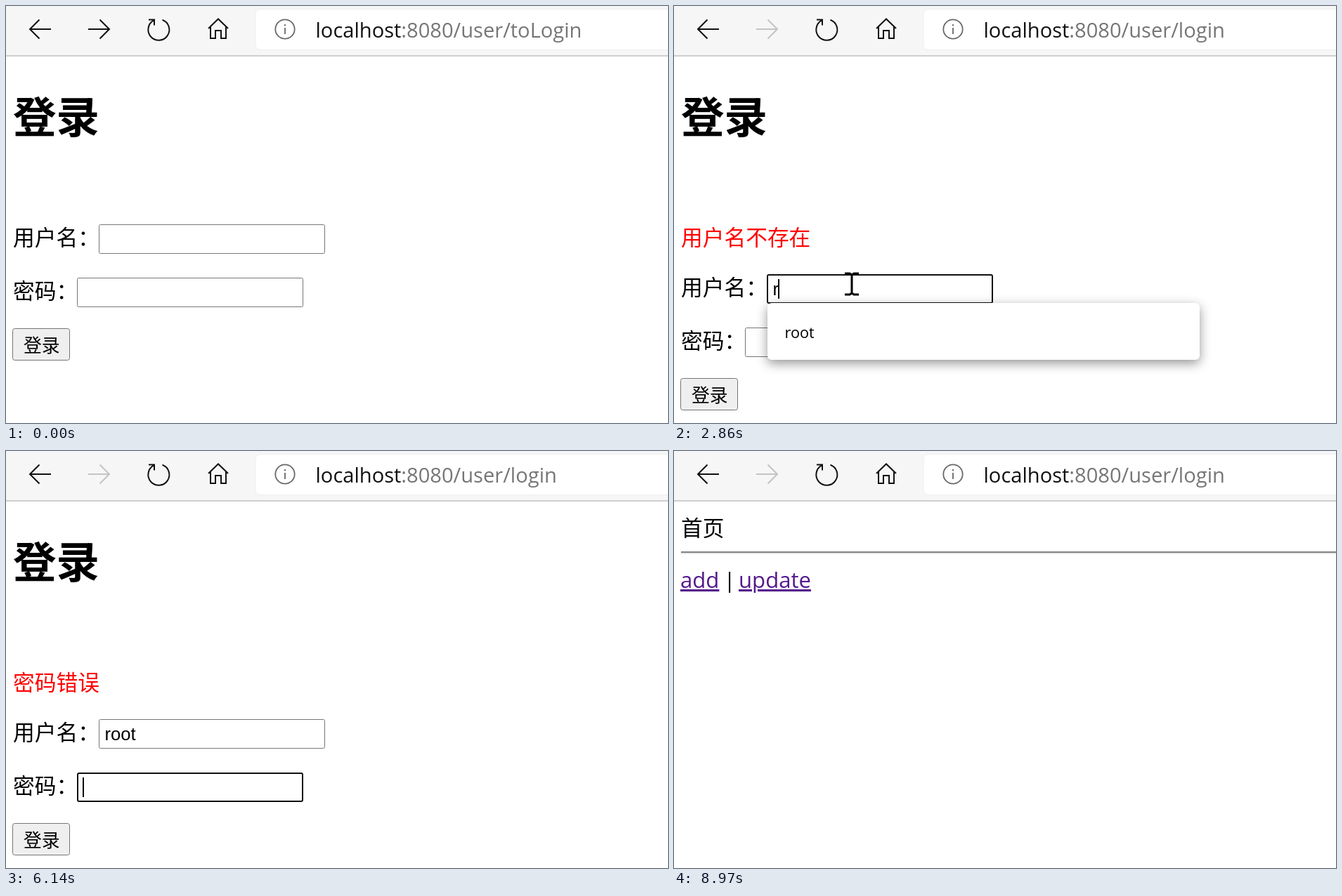
An HTML page for the animation above (9280 ms loop, 942 by 594 pixels).

```html
<!DOCTYPE html>
<html lang="zh-CN">
<head>
<meta charset="utf-8">
<style>
  html, body { margin: 0; width: 100%; height: 100%; overflow: hidden; background: #fff; }
  svg { display: block; width: 942px; height: 594px; }
  text { white-space: pre; }
  .zh { font: 30.72px "Noto Sans CJK SC", "Noto Sans CJK", sans-serif; }
  .ui { font-family: "Open Sans", "Noto Sans", sans-serif; }
  .field { font: 25.6px "Liberation Sans", Arial, sans-serif; }
  .link { font-size: 31.1px; fill: #551a8b; text-decoration: underline; text-decoration-thickness: 2px; text-underline-offset: 3px; }
  .icon { fill: none; stroke: #111; stroke-width: 2; }
  .box { fill: #fff; stroke: #767676; stroke-width: 1; }
  .box.hover { stroke: #4f4f4f; }
  .box.focus { stroke: #101010; stroke-width: 2; transform: translate(.5px, .5px); width: 320px; height: 40px; }
  #button { fill: #efefef; }
  #button.hover { fill: #e5e5e5; }
  #button.press { fill: #f5f5f5; }
  #popup { filter: drop-shadow(0 5px 8px rgba(0, 0, 0, .42)); }
  [hidden] { display: none; }
</style>
</head>
<body>
<svg viewBox="0 0 942 594">
  <clipPath id="view"><rect width="942" height="582"/></clipPath>

  <rect width="942" height="70.5" fill="#f6f6f6"/>
  <rect y="70" width="942" height="2" fill="#cfcfcf"/>
  <rect x="355" y="4.5" width="620" height="58" rx="7" fill="#fff" stroke="#efefef"/>
  <path class="icon" d="M64 33H34M47.500 19.500L34 33L47.500 46.500"/>
  <path class="icon" id="forward" d="M117 33H147M133.500 19.500L147 33L133.500 46.500"/>
  <path class="icon" id="reload" d="M222.500 19.700A15 15 0 1 1 210 20.700M203 19.500H211V27.500"/>
  <path class="icon" id="stop" d="M204 20L230 46M230 20L204 46"/>
  <path class="icon" d="M288 32L302 18.500L316 32M291 29.500V46H298V35H306V46H313V29.500"/>
  <g class="icon" style="stroke:#686868;stroke-width:1.8">
    <circle cx="397" cy="33" r="13.700"/>
    <path d="M397 31V40M397 26V28.500"/>
  </g>
  <text class="ui" x="440.500" y="45.300" font-size="29.080" fill="#767676"><tspan fill="#111">localhost</tspan>:8080/user/<tspan id="path"></tspan></text>

  <g id="login">
    <text class="zh" x="10" y="180.700" style="font-size:61.44px;font-weight:700">登录</text>
    <text class="zh" id="error" x="10" y="341.200" fill="#f00"></text>
    <g class="shift">
      <text class="zh" x="10" y="341.200">用户名：</text>
      <rect class="box" id="userBox" x="132.500" y="311.500" width="321" height="41" rx="2"/>
      <text class="field" id="user" x="140.500" y="340.500"></text>
      <text class="zh" x="10" y="417.200">密码：</text>
      <rect class="box" id="passBox" x="101.500" y="387.500" width="321" height="41" rx="2"/>
      <text class="field" id="pass" x="110" y="417"></text>
      <g id="eye" class="icon" style="stroke-width:1.6">
        <path d="M380 408.500Q393 394.500 406 408.500Q393 422.500 380 408.500Z"/>
        <circle cx="393" cy="408.500" r="4.500"/>
        <circle cx="393" cy="408.500" r="1.800" fill="#111" stroke="none"/>
      </g>
      <rect id="caret" width="2" height="28"/>
      <rect class="box" id="button" x="9.500" y="459.500" width="81" height="45" rx="3"/>
      <text class="zh" x="25" y="493" style="font-size:25.8px">登录</text>
    </g>
    <g clip-path="url(#view)">
      <g class="shift" id="popup">
        <rect id="sheet" x="133" y="352" width="615" rx="6" fill="#fff"/>
        <text class="ui" id="row1" x="157.500" y="402" font-size="21.600"></text>
        <text class="ui" id="row2" x="157.500" y="467" font-size="21.600"></text>
      </g>
    </g>
  </g>

  <g id="home">
    <text class="zh" x="10" y="120.500">首页</text>
    <rect x="10" y="143" width="932" height="2" fill="#848484"/>
    <rect x="10" y="145" width="932" height="1.500" fill="#dedede"/>
    <text class="ui link" x="9" y="195">add</text>
    <text class="ui" x="70.500" y="195" font-size="31.100">|</text>
    <text class="ui link" x="92" y="195">update</text>
  </g>

  <path id="beam" fill="none" stroke="#000" stroke-width="3" d="M-10 -15H-3L0 -13L3 -15H10M0 -14V14M-10 15H-3L0 13L3 15H10"/>
  <path id="arrow" fill="#fff" stroke="#111" stroke-width="1.200" d="M0 0V32L7 26L12 36L17.500 33.500L13 23.500H23.500Z"/>
</svg>
<script>
  const LOOP = 9280;
  const $ = id => document.getElementById(id);
  const beam = (x, y) => ({ cursor: ['beam', x, y] });
  const arrow = (x, y) => ({ cursor: ['arrow', x, y] });
  const noCursor = { cursor: null };
  const user = (text, list) => ({ user: text, list: list });
  const dots = n => ({ dots: n });
  const focusUser = { focus: 'user', list: ['root', '123'] };
  const focusPass = { focus: 'pass', list: null };
  const press = { focus: '', press: true };
  const load = { press: false, loading: true };
  const page = error => ({ path: 'login', error, user: '', dots: 0, focus: '', loading: false });

  const start = { path: 'toLogin', error: '', user: '', dots: 0, focus: '', list: null,
                  press: false, loading: false, home: false, cursor: null };

  // Each step changes part of the state from its time on.
  const steps = [
    [70, beam(265, 375)],
    [100, beam(265, 319)],
    [250, { ...focusUser, ...beam(265, 325) }],
    [420, user('1', ['123'])],
    [500, user('12', ['123'])],
    [580, user('123', null)],
    [650, beam(210, 372)],
    [730, beam(184, 405)],
    [950, focusPass],
    [1190, dots(1)],
    [1270, { ...dots(2), ...arrow(50, 495) }],
    [1420, dots(3)],
    [1500, press],
    [1580, load],
    [1730, page('用户名不存在')],
    [1960, arrow(70, 530)],
    [2040, arrow(140, 480)],
    [2120, beam(215, 415)],
    [2310, beam(253, 386)],
    [2400, focusUser],
    [2460, beam(253, 396)],
    [2860, user('r', ['root'])],
    [3010, user('ro', ['root'])],
    [3190, user('roo', ['root'])],
    [3270, user('root', null)],
    [3350, noCursor],
    [3490, focusPass],
    [3660, dots(1)],
    [3810, dots(2)],
    [3890, dots(3)],
    [3970, dots(4)],
    [4050, arrow(190, 530)],
    [4130, arrow(119, 542)],
    [4200, arrow(70, 552)],
    [4280, press],
    [4350, load],
    [4430, page('密码错误')],
    [4510, arrow(112, 543)],
    [4830, beam(240, 398)],
    [4910, focusUser],
    [4990, beam(97, 403)],
    [5380, { user: 'r' }],
    [5450, user('r', ['root'])],
    [5620, user('ro', ['root'])],
    [5690, user('roo', ['root'])],
    [5850, user('root', null)],
    [5920, noCursor],
    [6140, focusPass],
    [6390, dots(1)],
    [6460, dots(2)],
    [6540, beam(97, 403)],
    [6620, { ...dots(3), ...beam(160, 412) }],
    [6700, beam(205, 462)],
    [6780, { ...dots(4), ...beam(217, 477.5) }],
    [6930, dots(5)],
    [7180, dots(6)],
    [7250, arrow(150, 515)],
    [7330, arrow(72, 550)],
    [7410, press],
    [7490, load],
    [7650, { ...page(''), home: true }],
    [7730, arrow(95, 545)],
    [7810, arrow(140, 539)],
    [8200, arrow(387, 560)],
    [8280, noCursor],
    [8730, arrow(859, 572)],
    [8810, arrow(868, 560)],
    [8890, arrow(874, 575)],
    [8970, noCursor]
  ];

  function stateAt(time) {
    const state = { ...start };
    for (const [at, change] of steps) if (at <= time) Object.assign(state, change);
    return state;
  }

  const show = (id, on) => $(id).toggleAttribute('hidden', !on);

  function isOver(box, cursor, shift) {
    if (!cursor) return false;
    const num = name => +box.getAttribute(name);
    const dx = cursor[1] - num('x'), dy = cursor[2] - shift - num('y');
    return dx >= 0 && dx <= num('width') && dy >= 0 && dy <= num('height');
  }

  function render(s) {
    const shift = s.error ? 71 : 0;
    show('login', !s.home);
    show('home', s.home);
    show('reload', !s.loading);
    show('stop', s.loading);
    $('forward').style.stroke = s.path === 'login' ? '#c4c4c4' : '#111';
    $('path').textContent = s.path;
    $('error').textContent = s.error;
    $('user').textContent = s.user;
    $('pass').textContent = '•'.repeat(s.dots);
    document.querySelectorAll('.shift').forEach(g => g.setAttribute('transform', `translate(0 ${shift})`));

    for (const id of ['userBox', 'passBox', 'button']) {
      const box = $(id);
      box.classList.toggle('hover', isOver(box, s.cursor, shift));
      box.classList.toggle('focus', id === s.focus + 'Box');
    }
    $('button').classList.toggle('press', s.press);
    show('eye', s.focus === 'pass' && s.dots > 0);

    show('caret', s.focus);
    if (s.focus && !s.home) {
      const field = $(s.focus);
      const width = field.textContent ? field.getComputedTextLength() : 0;
      $('caret').setAttribute('x', Math.round(+field.getAttribute('x') + width - 1));
      $('caret').setAttribute('y', s.focus === 'user' ? 318 : 394);
    }

    show('popup', s.list);
    if (s.list) {
      $('sheet').setAttribute('height', s.list.length > 1 ? 280 : 81);
      $('row1').textContent = s.list[0];
      $('row2').textContent = s.list[1] || '';
    }

    for (const kind of ['beam', 'arrow']) {
      const on = s.cursor && s.cursor[0] === kind;
      show(kind, on);
      if (on) $(kind).setAttribute('transform', `translate(${s.cursor[1]} ${s.cursor[2]})`);
    }
  }

  const begin = performance.now();
  function frame() {
    render(stateAt((performance.now() - begin) % LOOP));
    requestAnimationFrame(frame);
  }
  frame();
</script>
</body>
</html>
```
